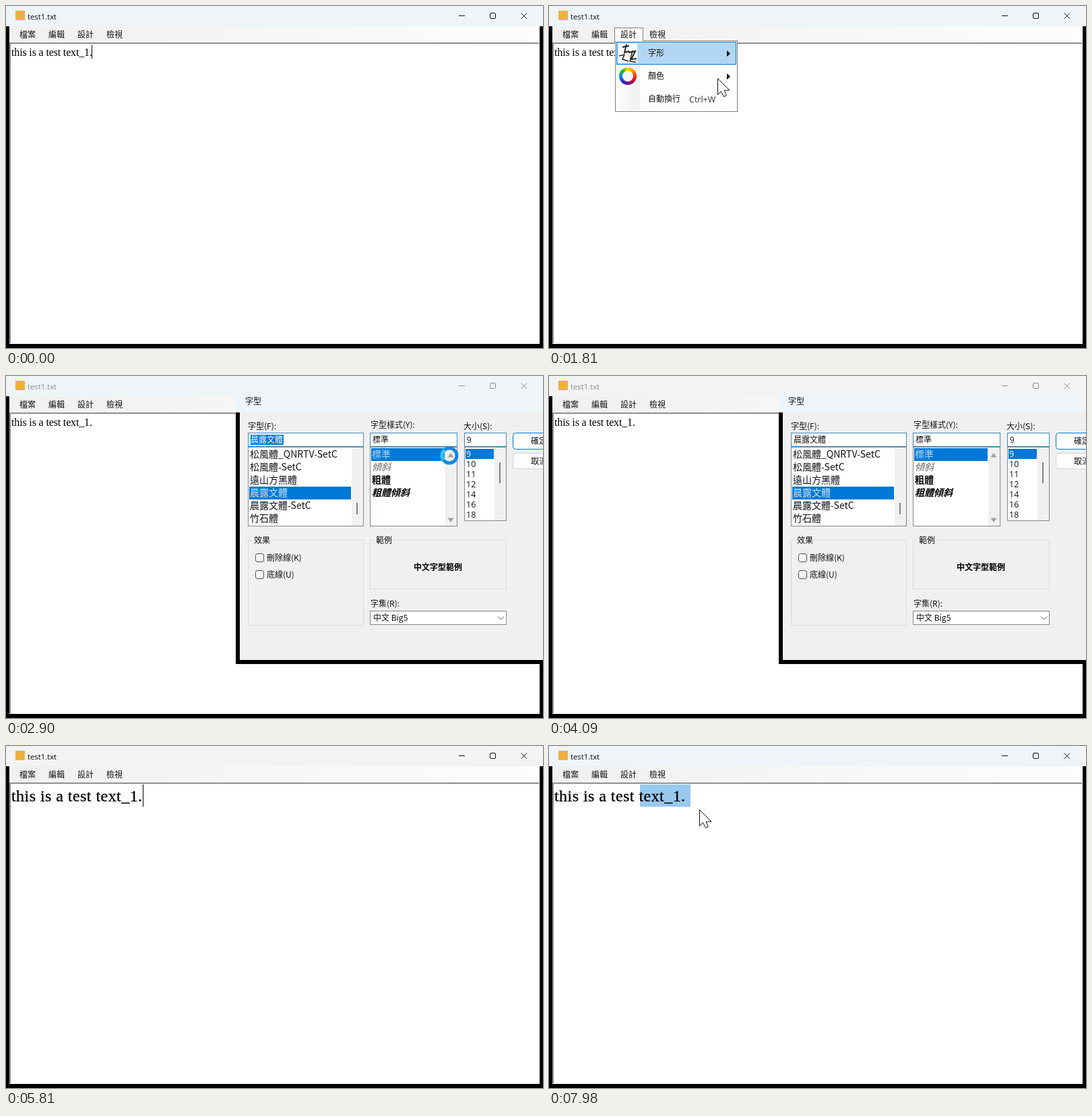
Recreate the animation shown at these times as an HTML page with a canvas. Size 797x507 px, loop 8000 ms.

```html
<!DOCTYPE html>
<html lang="zh-Hant">
<head>
<meta charset="utf-8">
<style>
html, body { margin: 0; width: 100%; height: 100%; overflow: hidden; background: #000; }
canvas { display: block; }
</style>
</head>
<body>
<canvas id="stage" width="797" height="507"></canvas>
<script>
const c = document.getElementById('stage').getContext('2d');
const CJK = '"Noto Sans CJK TC", "Noto Sans CJK", sans-serif';
const UI = '"Open Sans", "Noto Sans CJK TC", sans-serif';
const SERIF = '"Liberation Serif", serif';
const BLUE = '#0078d7', HOT = '#b3d7f3';

function box(x, y, w, h, fill, stroke) {
  if (fill) { c.fillStyle = fill; c.fillRect(x, y, w, h); }
  if (stroke) {
    c.strokeStyle = stroke; c.lineWidth = 1;
    c.strokeRect(x + .5, y + .5, w - 1, h - 1);
  }
}
function round(x, y, w, h, r, fill, stroke) {
  c.beginPath(); c.roundRect(x + .5, y + .5, w - 1, h - 1, r);
  if (fill) { c.fillStyle = fill; c.fill(); }
  c.strokeStyle = stroke; c.lineWidth = 1; c.stroke();
}
function text(s, x, y, size = 12, color = '#111', family = CJK, style = '') {
  c.font = `${style} ${size}px ${family}`;
  c.fillStyle = color; c.fillText(s, x, y);
}
function poly(points, fill, stroke) {
  c.beginPath();
  points.forEach(([x, y]) => c.lineTo(x, y));
  c.closePath();
  if (fill) { c.fillStyle = fill; c.fill(); }
  if (stroke) { c.strokeStyle = stroke; c.lineWidth = 1; c.stroke(); }
}
function line(points, color, width = 1) {
  c.beginPath();
  points.forEach(([x, y], i) => i ? c.lineTo(x, y) : c.moveTo(x, y));
  c.strokeStyle = color; c.lineWidth = width; c.stroke();
}

// Pointer keys: time, x, y; a key without a place hides it.
const keys = [
  [0], [90, 514, 173], [450, 180, 58], [639, 180, 58], [640, 182, 54],
  [909, 182, 54], [910, 186, 54], [1000], [1540, 205, 66], [1810, 250, 107],
  [1989, 250, 107], [1990, 300, 72], [2170, 430, 72], [2350], [2630, 656, 118],
  [2900], [3180, 656, 118], [3360, 620, 240], [3540, 575, 152], [4089, 575, 152], [4090],
  [6260, 498, 180], [6980, 233, 116], [7070, 205, 75], [7160, 150, 72],
  [7430, 353, 118], [7620, 353, 118], [7980, 223, 94]
];
function pointer(t) {
  const i = keys.findLastIndex(k => k[0] <= t);
  const [ta, xa, ya] = keys[i], [tb, xb, yb] = keys[i + 1] || keys[i];
  if (xa === undefined) return;
  const f = xb === undefined || tb === ta ? 0 : Math.floor((t - ta) / 90) * 90 / (tb - ta);
  const x = Math.round(xa + (xb - xa || 0) * f) + .5, y = Math.round(ya + (yb - ya || 0) * f) + .5;
  poly([[0, 0], [0, 24], [5, 19], [9, 27], [13, 25], [9.5, 17.5], [17.5, 17.5]]
    .map(p => [x + p[0], y + p[1]]), '#fff', '#111');
}

function frame(t) {
  const dialogOpen = t >= 2900 && t < 5540;
  const ink = dialogOpen ? '#8b8f92' : '#111';
  box(0, 0, 797, 507, '#000');
  box(0, 0, 797, 30, t >= 3180 && t < 5900 ? '#f3f3f3' : '#eef4f7');
  box(14, 7, 14, 14, '#f0b040');
  text('test1.txt', 32, 19.5, 11.3, ink, UI);
  line([[672, 14.5], [681, 14.5]], ink);
  round(718, 10, 9, 9, 1.5, null, ink);
  line([[764.5, 10.5], [773, 19]], ink);
  line([[773, 10.5], [764.5, 19]], ink);

  const bar = c.createLinearGradient(5, 0, 792, 0);
  bar.addColorStop(0, '#f0f0f0'); bar.addColorStop(1, '#fdfdfd');
  box(5, 30, 787, 24, bar);
  box(5, 54, 787, 447, '#f4f4f4');
  box(5, 54, 786, 446, '#a0a0a0');
  box(6, 55, 785, 445, '#808080');
  box(7, 56, 784, 444, '#fff');
  if (t >= 730 && t < 1180) box(97, 32, 43, 20, HOT, BLUE);
  if (t >= 1180 && t < 2900) box(97, 32, 43, 21, '#fcfcfc', '#808080');
  ['檔案', '編輯', '設計', '檢視'].forEach((s, i) => text(s, 20 + 43 * i, 46.5));
}

function note(t) {
  const big = t >= 5630;
  if (t >= 7160) box(135, 57, 75, 33, '#99c9ef');
  c.letterSpacing = big ? '.45px' : '-.15px';
  text('this is a test text_1.', 8, big ? 82 : 73.5, big ? 24 : 16, '#000', SERIF);
  if (big) {
    c.strokeStyle = '#000'; c.lineWidth = .3;
    c.strokeText('this is a test text_1.', 8, 82);
  }
  c.letterSpacing = '0px';
  if (t < 2900) box(127, 58, 1, 20, '#000');
  if (big && t < 7070) box(203, 57, 1, 33, '#000');
}

function menu(x, y, w, h, rows, hot, arrows) {
  box(x, y, w, h, '#fdfdfd', '#808080');
  const strip = c.createLinearGradient(x + 2, 0, x + 38, 0);
  strip.addColorStop(0, '#fcfcfc'); strip.addColorStop(1, '#f0f0f0');
  box(x + 2, y + 2, 35, h - 4, strip);
  rows.forEach((s, i) => {
    const top = y + 2 + 34 * i;
    if (i === hot) box(x + 2, top, w - 4, 34, HOT, BLUE);
    text(s, x + 49, top + 21);
    if (i < arrows) poly([[x + w - 16, top + 13], [x + w - 11, top + 17.5], [x + w - 16, top + 22]], '#000');
  });
}
function menus(t) {
  if (t < 1180 || t >= 2900) return;
  menu(98, 51, 182, 106, ['字形', '顏色', '自動換行'], t >= 1360 ? 0 : -1, 2);
  box(98, 51, 41, 1, '#fcfcfc');
  text('Ctrl+W', 208, 142.5, 12.5, '#333', UI);
  box(103, 56, 28, 28, '#fff');
  line([[109, 61], [119, 59]], '#222', 2);
  line([[115, 57], [112, 69], [119, 67]], '#222', 2);
  line([[104, 74], [112, 72], [109, 79], [118, 82]], '#222', 1.5);
  line([[118, 69], [128, 67], [122, 79], [130, 78]], '#222', 2);
  line([[124, 66], [120, 82], [129, 83]], '#222', 1.5);
  const wheel = c.createConicGradient(-Math.PI / 2, 117, 104);
  ['#ffe000', '#ff9000', '#f03010', '#c00040', '#7010a0', '#2030d0', '#1090e0', '#20b030', '#ffe000']
    .forEach((s, i) => wheel.addColorStop(i / 8, s));
  c.beginPath(); c.arc(117, 104, 10.5, 0, 7);
  c.strokeStyle = wheel; c.lineWidth = 5; c.stroke();
  if (t >= 1900) menu(279, 52, 164, 72, ['中文字形', '英文字形'], t >= 1990 ? 0 : -1, 2);
  if (t >= 2170) menu(443, 54, 231, 108, ['變更全部字形', '變更選取字形', '還原預設字形'], t >= 2350 ? 1 : -1, 0);
}

function field(x, w, s, selected) {
  box(x, 84, w, 21, '#fff', '#3c86bd');
  c.font = `12px ${CJK}`;
  if (selected) box(x + 4, 87, c.measureText(s).width + 1, 15, BLUE);
  text(s, x + 4, 98.5, 12, selected ? '#fff' : '#111');
}
function list(x, w, h) {
  box(x, 105, w, h, '#fff', '#828790');
  box(x + w - 18, 106, 17, h - 2, '#f0f0f0');
}
function group(x, w, h, s) {
  box(x, 243, w, h, null, '#dcdcdc');
  box(x + 7, 240, 28, 6, '#f0f0f0');
  text(s, x + 9, 247.5);
}

function dialog(t) {
  if (t < 2900 || t >= 5540) return;
  const bold = t >= 4180, sized = t >= 5090, large = t >= 5180;
  box(341, 54, 456, 373, '#000');
  box(341, 25, 456, 29, '#eef4f8');
  box(347, 54, 450, 367, '#f0f0f0');
  text('字型', 355, 42);
  text('字型(F):', 359, 78.5);
  text('字型樣式(Y):', 541, 77);
  text('大小(S):', 679, 78.5);

  field(359, 172, '晨露文體', t < 4090);
  field(540, 130, bold ? '粗體' : '標準', bold && !sized);
  field(680, 63, large ? '18' : '9', sized);
  list(359, 172, 118);
  list(540, 130, 118);
  list(680, 63, 110);

  box(361, 164, 151, 19, BLUE);
  ['松風體_QNRTV-SetC', '松風體-SetC', '遠山方黑體', '晨露文體', '晨露文體-SetC', '竹石體']
    .forEach((s, i) => text(s, 362, 121 + 19 * i, 14, i === 3 ? '#cfe4f7' : '#111'));
  box(520, 188, 2, 17, '#808080');

  const pick = bold ? 2 : 0;
  box(542, 107 + 19 * pick, 109, 19, BLUE);
  [['標準', '300'], ['傾斜', 'italic 300'], ['粗體', 'bold'], ['粗體傾斜', 'italic bold']]
    .forEach(([s, style], i) => text(s, 543, 121 + 19 * i, 14,
      i === pick ? (i ? '#fff' : '#b8d8f2') : i < 2 ? '#666' : '#000', CJK, style));
  if (t < 4640) {
    poly([[655.5, 120.5], [660, 114], [664.5, 120.5]], '#a0a0a0');
    poly([[655.5, 210.5], [664.5, 210.5], [660, 217]], '#a0a0a0');
  }

  const size = sized ? 6 : 0;
  box(682, 108 + 15 * size, 42, 15, BLUE);
  [9, 10, 11, 12, 14, 16, 18].forEach((n, i) =>
    text(n, 683, 119.5 + 15 * i, 12.5, i === size ? '#fff' : '#111', UI));
  box(732, 128, 2, 31, '#808080');

  group(359, 172, 127, '效果');
  group(540, 203, 73, '範例');
  ['刪除線(K)', '底線(U)'].forEach((s, i) => {
    round(370, 263 + 25 * i, 13, 13, 2.5, '#f6f6f6', '#555');
    text(s, 387, 273.5 + 25 * i);
  });
  c.textAlign = 'center';
  const px = large ? 24 : bold ? 13 : 12;
  text('中文字型範例', 641, 284 + px * .37, px, '#000', CJK, 'bold');
  c.textAlign = 'left';

  text('字集(R):', 541, 341.5);
  box(540, 348, 203, 21, '#fff', '#858585');
  text('中文 Big5', 545, 362.5);
  line([[730, 356.5], [734.5, 361], [739, 356.5]], '#555');
  round(752, 84, 90, 25, 4, '#fdfdfd', BLUE);
  round(752, 114, 90, 24, 4, '#fdfdfd', '#d0d0d0');
  text('確定', 779, 101);
  text('取消', 779, 130.5);

  if (t < 3180) {
    c.lineWidth = 5;
    c.beginPath(); c.arc(658, 118, 11, 0, 7); c.strokeStyle = '#1787e0'; c.stroke();
    c.beginPath(); c.arc(658, 118, 11, 2.5, 4); c.strokeStyle = '#35c3f3'; c.stroke();
  }
}

function draw(now) {
  const t = now % 8000;
  frame(t);
  note(t);
  menus(t);
  dialog(t);
  pointer(t);
}
let start;
function tick(now) {
  start ??= now;
  draw(now - start);
  requestAnimationFrame(tick);
}
draw(0);
requestAnimationFrame(tick);
</script>
</body>
</html>
```
